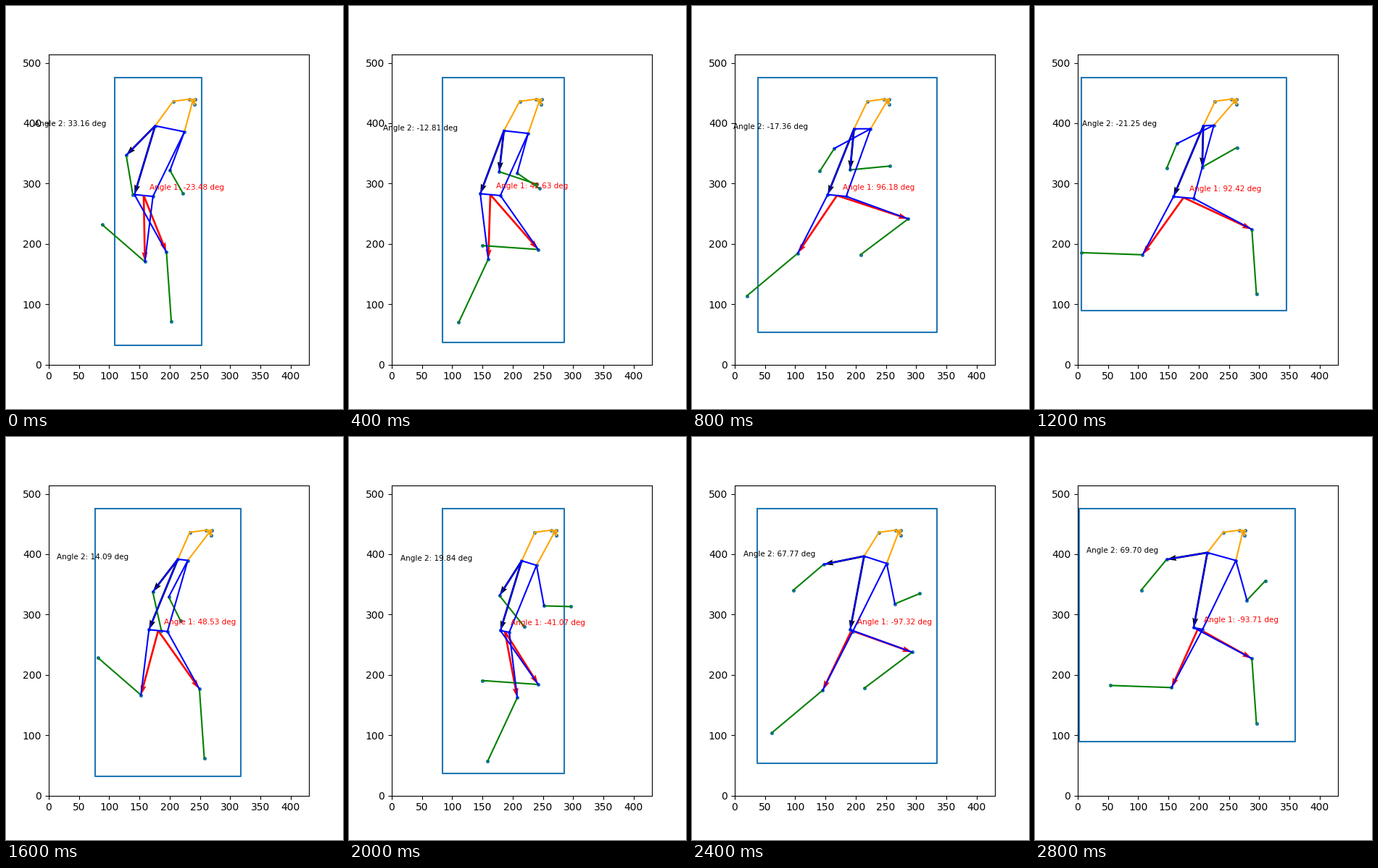
Write a matplotlib script that moves like this. It is 465 px wide and 557 px high and loops after 3.2 s.

```python
import numpy as np
import matplotlib.pyplot as plt
from matplotlib.animation import FuncAnimation

W, H, DPI = 465, 557, 100
STEPS = 8
XMAX, YMAX = 430, 514
LEFT, BASE = 59.4, 496  # data origin on the stage, in pixels
UNIT = 0.77 * H / YMAX  # pixels per data unit

# Limb angles over one stride: degrees from straight down, forward positive.
# The left side runs the same curves half a stride later.
THIGH = [29, 7, -27, -28, -7, 35, 70, 62]
SHIN = [4, -25, -50, -92, -131, -94, -53, 4]
UPPER_ARM = [-36, 2, 3, 7, -29, -24, -70, -72]
FOREARM = [18, 80, 104, 128, 21, 47, -41, -31]

# Detection box sides over one stride; its lower edge repeats every pace
BOX_LEFT = [150, 129, 91, 64.5, 123, 129, 90.5, 61.5]
BOX_RIGHT = [270, 297, 338, 347.5, 324, 297, 338, 359.5]
BOX_BOTTOM = [469, 465, 451, 421]
BOX_TOP = 99

LEG_ANGLE = [-23.48, 42.63, 96.18, 92.42, 48.53, -41.07, -97.32, -93.71]
ARM_ANGLE = [33.16, -12.81, -17.36, -21.25, 14.09, 19.84, 67.77, 69.70]

# Face points relative to the right eye
FACE = {"r_ear": (-22.5, 3), "r_eye": (0, 0), "l_eye": (7.5, 0),
        "nose": (7, 7), "l_ear": (4.5, 3)}

BONES = {
    "orange": ["r_sho r_ear", "r_ear r_eye", "r_eye l_eye", "r_eye nose",
               "l_eye nose", "l_eye l_ear", "l_ear l_sho"],
    "green": ["r_elb r_wri", "l_elb l_wri", "r_kne r_ank", "l_kne l_ank"],
    "blue": ["r_sho l_sho", "r_sho r_elb", "l_sho l_elb", "r_sho r_hip",
             "l_sho l_hip", "r_hip l_hip", "r_hip r_kne", "l_hip l_kne"],
}


def to_data(p):
    return np.array([(p[0] - LEFT) / UNIT, (BASE - p[1]) / UNIT])


def limb(start, length, degrees):
    a = np.radians(degrees)
    return start + length * np.array([np.sin(a), np.cos(a)])


def skeleton(i):
    """Joints of the runner at step i, as data coordinates."""
    th = 2 * np.pi * i / STEPS
    sin, cos = np.sin, np.cos

    # Trunk: slow drift to the right, bobbing and twisting with the stride
    shoulders = np.array([226.5 + 4.5 * i, 170 + 4.5 * sin(2 * th)])
    hips = np.array([190.5 + 5 * i, 265 - 4 * cos(th - np.pi / 4)])
    sho_span = np.array([27 + 14 * cos(th + 0.3), 5 + 6 * cos(th + 1)])
    hip_span = np.array([20 + 11 * sin(th) + 5.5 * cos(2 * th), 2.5])
    eye = np.array([257 + 4 * i - 3.5 * cos(th), 129])

    pts = {name: eye + off for name, off in FACE.items()}
    for side, sign, lag, reach in (("r_", -1, 0, 55), ("l_", 1, STEPS // 2, 37)):
        k = (i + lag) % STEPS
        phase = 2 * np.pi * k / STEPS
        lean = 8.5 * sign  # the right arm hangs further back
        sho = shoulders + sign * sho_span / 2
        hip = hips + sign * hip_span / 2
        elb = limb(sho, 57, UPPER_ARM[k] + lean)
        kne = limb(hip, 91, THIGH[k])
        joints = {"sho": sho, "elb": elb, "wri": limb(elb, reach, FOREARM[k] + lean),
                  "hip": hip, "kne": kne,
                  "ank": limb(kne, 87 + 10 * cos(phase - 0.5), SHIN[k])}
        pts.update({side + name: p for name, p in joints.items()})
    return {name: to_data(p) for name, p in pts.items()}


fig, ax = plt.subplots(figsize=(W / DPI, H / DPI), dpi=DPI)


def arrows(start, ends):
    vecs = np.array(ends) - start
    return [start[0]] * 2, [start[1]] * 2, vecs[:, 0], vecs[:, 1]


def draw(i):
    ax.cla()
    ax.set(xlim=(0, XMAX), ylim=(0, YMAX), aspect="equal",
           xticks=range(0, 401, 50), yticks=range(0, 501, 100))
    pts = skeleton(i)
    mid, sho = (pts["r_hip"] + pts["l_hip"]) / 2, pts["r_sho"]

    x0, y0 = to_data((BOX_LEFT[i], BOX_TOP))
    x1, y1 = to_data((BOX_RIGHT[i], BOX_BOTTOM[i % 4]))
    ax.plot([x0, x1, x1, x0, x0], [y0, y0, y1, y1, y0], color="C0", lw=1.5)

    style = dict(angles="xy", scale_units="xy", scale=1, width=0.0075)
    ax.quiver(*arrows(mid, [pts["r_kne"], pts["l_kne"]]), color="red", **style)
    ax.quiver(*arrows(sho, [pts["r_elb"], pts["r_hip"]]), color="black", **style)
    ax.scatter(*np.array(list(pts.values())).T, s=7, color="C0")
    for color, bones in BONES.items():
        for bone in bones:
            a, b = (pts[name] for name in bone.split())
            ax.plot([a[0], b[0]], [a[1], b[1]], color=color, lw=1.5)

    ax.text(*(mid + 10), f"Angle 1: {LEG_ANGLE[i]:.2f} deg", color="red", fontsize=7.5)
    ax.text(sho[0] - 200, sho[1], f"Angle 2: {ARM_ANGLE[i]:.2f} deg",
            color="black", fontsize=7.5)
    return []


anim = FuncAnimation(fig, draw, frames=STEPS, interval=400,
                     init_func=lambda: [], repeat=True, repeat_delay=0)
plt.show()
```
